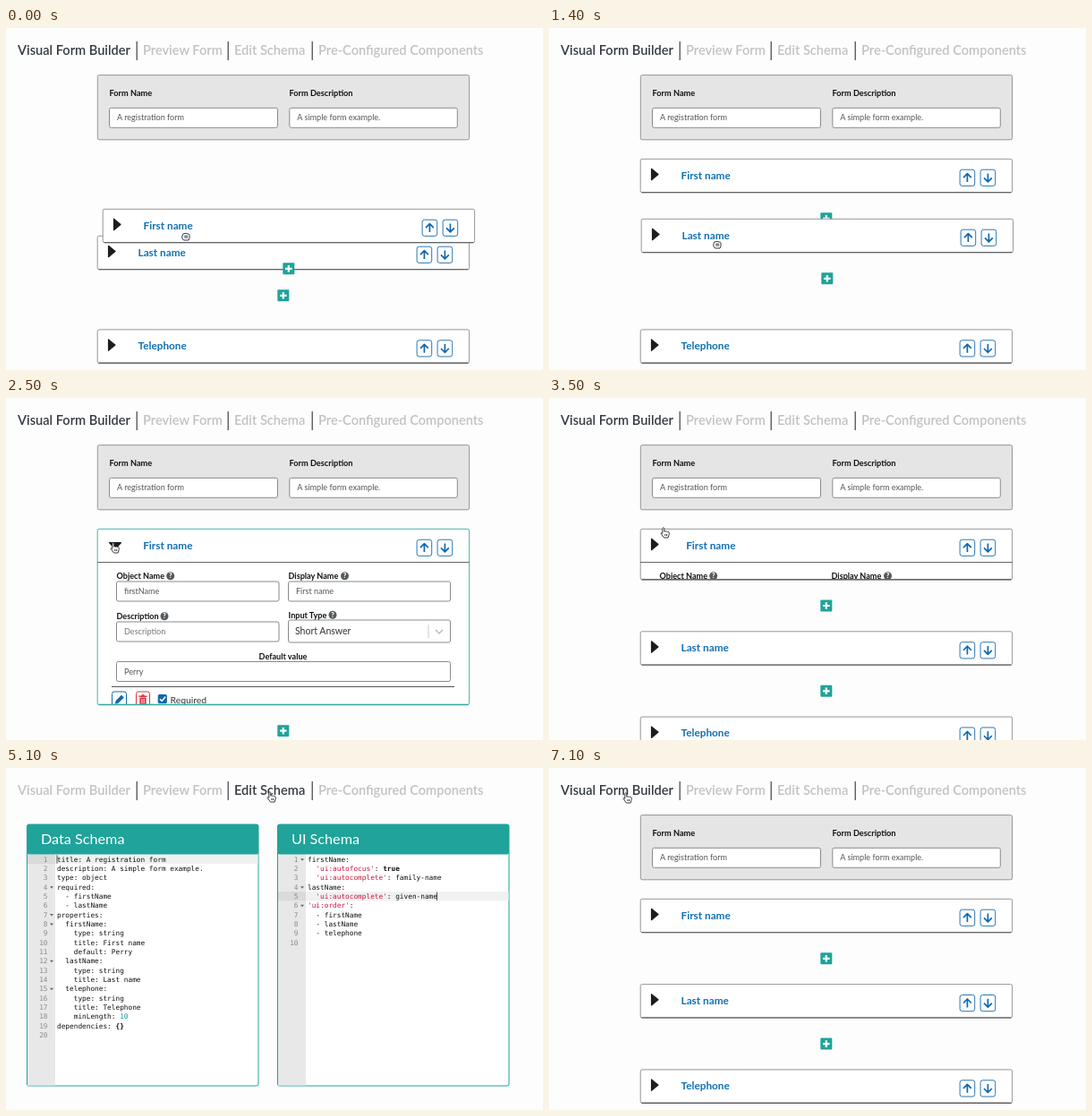
Write an HTML page that moves like this. It is 600x382 px and loops after 7.2 s.

```html
<!DOCTYPE html>
<html lang="en">
<head>
<meta charset="utf-8">
<title>Form builder</title>
<style>
  html, body { margin: 0; width: 100%; height: 100%; overflow: hidden; background: #fdfdfd; }
  svg { display: block; width: 100vw; height: 100vh; }
  text { font-family: Lato, "Open Sans", sans-serif; white-space: pre; }
  .code { font: 7.77px "DejaVu Sans Mono", monospace; }
</style>
</head>
<body>
<svg id="stage" viewBox="0 0 600 382"></svg>
<script>
const LOOP = 7200, STEP = 100;
const TEAL = '#1fa39a', BLUE = '#1268ad', GRAY = '#858b8e', DARK = '#212529';
const TOP = 146, PITCH = 95.3, OPEN_HEIGHT = 173;
const PERSON = 'Perry';

// Pointer path: time, x, y
const pointer = [
  [0, 201, 233], [200, 204, 250], [400, 205, 262], [500, 204, 264], [600, 202, 257],
  [800, 190, 190], [900, 188, 180], [1000, 187, 183], [1100, 187, 215], [1200, 187, 233],
  [1400, 188, 242], [1500, 188.5, 258], [1600, 189, 268], [1700, 187, 260], [2200, 122, 167],
  [3200, 122, 167], [3500, 130, 150], [4000, 184, 32], [4500, 184, 32], [4700, 297, 32],
  [5500, 297, 32], [5600, 340, 95], [5700, 398, 150], [5800, 320, 120], [5900, 170, 70],
  [6000, 53, 40], [6100, 88, 33], [LOOP, 88, 33]
];

const lerp = (a, b, u) => a + (b - a) * u;
const easeOut = (t, start, end) => {
  const u = Math.min(1, Math.max(0, (t - start) / (end - start)));
  return 1 - (1 - u) ** 2;
};

function pointerAt(t) {
  const i = pointer.findIndex(p => p[0] > t);
  const [a, b] = [pointer[i - 1], pointer[i]];
  const u = (t - a[0]) / (b[0] - a[0]);
  return [lerp(a[1], b[1], u), lerp(a[2], b[2], u)];
}

const text = (x, y, size, str, fill = '#555', weight = 400, anchor = 'start') =>
  `<text x="${x}" y="${y}" font-size="${size}" fill="${fill}" font-weight="${weight}" text-anchor="${anchor}">${str}</text>`;
const rect = (x, y, w, h, fill, stroke = 'none', r = 0, sw = 1) =>
  `<rect x="${x}" y="${y}" width="${w}" height="${h}" rx="${r}" fill="${fill}" stroke="${stroke}" stroke-width="${sw}"/>`;
const path = (d, stroke, sw = 1, fill = 'none') =>
  `<path d="${d}" stroke="${stroke}" stroke-width="${sw}" fill="${fill}" stroke-linejoin="round"/>`;
const group = (x, y, body) => `<g transform="translate(${x} ${y})">${body}</g>`;
const field = (x, y, w, h, value = '', fill = '#555') =>
  rect(x, y, w, h, '#fff', GRAY, 2) + text(x + 8.5, y + h / 2 + 3, 9.1, value, fill);

function tabs(active) {
  const names = ['Visual Form Builder', 'Preview Form', 'Edit Schema', 'Pre-Configured Components'];
  return [13, 153, 255, 349].map((x, i) =>
    text(x, 30.4, 14.6, names[i], i === active ? '#343a40' : '#c1c2c4', 600)).join('') +
    path('M146.2 15V36M248.2 15V36M342.2 15V36', '#3c4044', 1.2);
}

const plusButton = (x, y) =>
  rect(x - 6.5, y - 6.5, 13, 13, TEAL, 'none', 1) + path(`M${x - 3.8} ${y}h7.6M${x} ${y - 3.8}v7.6`, '#fff', 2.2);

const arrowButton = (x, dir) => rect(x, 12.2, 16.6, 18.2, '#fff', BLUE, 2.5, .9) +
  path(`M${x + 8.3} ${21.3 + 4.8 * dir}v${-9.4 * dir}m-4.4 ${4.5 * dir}l4.4 ${-4.5 * dir}l4.4 ${4.5 * dir}`, BLUE, 1.7);

const label = (x, y, str, iconX) => text(x, y, 9.1, str, '#111', 700) +
  `<circle cx="${iconX}" cy="${y - 3.3}" r="4.5" fill="#555a5e"/>` + text(iconX, y - .6, 7.5, '?', '#fff', 900, 'middle');

// Fields inside the expanded card, relative to its top left corner
function details() {
  return path('M0 37.5H416', '#666') +
    label(21.5, 56, 'Object Name', 81.7) + field(21.5, 59, 181.5, 22, 'firstName') +
    label(213.5, 56, 'Display Name', 276.5) + field(213.5, 59, 181, 22, 'First name') +
    label(21.5, 101, 'Description', 75) + field(21.5, 104, 181.5, 22, 'Description', '#777') +
    label(213.5, 99.5, 'Input Type', 263) + rect(213.5, 102, 181, 25, '#fff', GRAY, 2) +
    text(221, 118, 10.5, 'Short Answer', '#333') +
    path('M370 107V122', '#ccc') + path('M378 113l4 4l4-4', '#bbb', 1.5) +
    text(207.5, 145.5, 9.1, 'Default value', '#111', 700, 'middle') +
    field(21.5, 148.5, 373, 22, PERSON) + path('M16 176.5H399', '#555') +
    rect(16.5, 182, 16, 19, '#fff', BLUE, 2.5) +
    path('M20 195.5l1-3.5l6-6l2.5 2.5l-6 6z', BLUE, .6, BLUE) +
    rect(43.5, 182, 15, 19, '#fff', '#dc3545', 2.5) +
    path('M46.5 187.2h9M49.5 186h3', '#dc3545', 1.4) + rect(47.3, 188.6, 7.4, 8.4, '#dc3545', 'none', .8) +
    path('M49.4 190v5.5M51 190v5.5M52.6 190v5.5', '#fff', .6) +
    rect(67.7, 185, 10.2, 10.2, '#1367b0', 'none', 1.8) + path('M70 190.2l2.1 2.2l4-4.6', '#fff', 1.5) +
    text(81.5, 194.5, 10.4, 'Required', '#333');
}

function card(title, x, y, extra = 0, open = false, focused = false) {
  const h = 37.4 + extra, edge = focused ? '#35aaa0' : '#8b8b8b';
  let body = rect(.2, .3, 415.4, h, '#fff', edge, 2, .9);
  if (extra) body += `<svg width="416" height="${h}" overflow="hidden">${details()}</svg>`;
  body += path(`M1.5 ${h + .2}H414.5`, focused ? edge : '#666', 1.4) +
    path(open ? 'M13.5 15.5H26.5L20 22.5Z' : 'M12.5 11.3V23.7L20 17.5Z', '#1b1e20', 1.2, '#1b1e20') +
    text(extra ? 51.2 : 45.5, 22.5, 11.8, title, '#1270b3', 700) +
    arrowButton(357.1, 1) + arrowButton(380.1, -1) + plusButton(207.8, h + 29.4);
  return group(102 + x, y, body);
}

function builder(t, px, py) {
  const first = { title: 'First name', x: 0, y: TOP }, last = { title: 'Last name', x: 0, y: TOP + PITCH };
  const follow = (item, grabX, grabY, release) => {
    const drop = easeOut(t, release, release + 200);
    const [hx, hy] = t < release ? [px, py] : pointerAt(release);
    item.x = lerp(hx - grabX, 0, drop);
    item.y = lerp(TOP + hy - grabY, TOP + PITCH, drop);
  };
  let dragged = last;
  if (t < 950) {
    dragged = first;
    follow(first, 195, 177, 500);
    last.y = lerp(232, TOP, easeOut(t, 0, 250));
  } else if (t < 1850) {
    follow(last, 187, 175, 1600);
    first.y = lerp(TOP + PITCH, TOP, easeOut(t, 1130, 1350));
  }
  const extra = OPEN_HEIGHT * (easeOut(t, 2250, 2600) - easeOut(t, 3300, 3600));
  const open = t >= 2250 && t < 3300;
  const draw = item => item === first
    ? card(item.title, item.x, item.y, extra, open, open && t < 3000)
    : card(item.title, item.x, item.y + extra);
  const rest = dragged === first ? last : first;

  return rect(102.3, 52.6, 415.3, 72.2, '#e5e5e6', '#8b8b8b', 2, .9) +
    text(115.5, 75.7, 9.2, 'Form Name', '#111', 700) + field(115.5, 89.3, 188, 22, 'A registration form') +
    text(316.5, 75.7, 9.2, 'Form Description', '#111', 700) + field(316.8, 89.3, 187.5, 22, 'A simple form example.') +
    card('Telephone', 0, TOP + 2 * PITCH + extra) + draw(rest) + draw(dragged);
}

function preview() {
  const names = ['First name', 'Last name', 'Telephone'];
  return text(13, 62, 9.1, 'A simple form example.') +
    text(13, 89.3, 11.4, 'A registration form', TEAL, 700) +
    text(13, 111.7, 9.1, 'A simple form example.') +
    names.map((name, i) => {
      const y = 137 + 53 * i;
      return text(22.5, y, 10.3, name, DARK, 700) +
        (i < 2 ? text(76 - i, y, 7.7, 'Required', '#888') : '') +
        field(22.5, y + 13, 258, 22, i ? '' : PERSON);
    }).join('') +
    rect(264.8, 157.2, 9.6, 7.6, '#fff', '#777', 1) + rect(266.3, 159, 3, 4, '#777') +
    path('M270.5 159.5h2.5M270.5 161h2.5M270.5 162.6h2.5', '#777', .7) +
    rect(13, 291, 49.5, 25, '#1964a3', 'none', 2.5) + text(37.7, 306.8, 9.3, 'Submit', '#fff', 400, 'middle');
}

const dataSchema = `title: A registration form
description: A simple form example.
type: object
required:
  - firstName
  - lastName
properties:
  firstName:
    type: string
    title: First name
    default: ${PERSON}
  lastName:
    type: string
    title: Last name
  telephone:
    type: string
    title: Telephone
    minLength: 10
dependencies: {}
`;
const uiSchema = `firstName:
  'ui:autofocus': true
  'ui:autocomplete': family-name
lastName:
  'ui:autocomplete': given-name
'ui:order':
  - firstName
  - lastName
  - telephone
`;

const highlight = line => line
  .replace(/\b\d+/, '<tspan fill="#099">$&</tspan>')
  .replace(/'.*?'/, '<tspan fill="#d1143f">$&</tspan>')
  .replace(/true|\{\}/, '<tspan font-weight="700">$&</tspan>');

function editor(x, title, source, active, caretX) {
  const rowY = i => 39 + i * 10.32;
  const rows = source.split('\n').map((line, i) => {
    const y = rowY(i) + 2.8;
    const fold = /:$/.test(line) ? path(`M25.5 ${y - 3.6}h4l-2 2.5z`, 'none', 0, '#666') : '';
    return `<text class="code" x="23" y="${y}" fill="#8a8a8a" text-anchor="end">${i + 1}</text>${fold}` +
      `<text class="code" x="33.5" y="${y}" fill="#111">${highlight(line)}</text>`;
  }).join('');
  const top = rowY(active) - 5.2;
  return group(x, 63, rect(0, 0, 258.5, 292, '#fff', TEAL, 2) +
    rect(.5, 33.5, 31, 258, '#e8e8e8') + rect(.5, top, 31, 10.3, '#d9dadb') +
    rect(31.5, top, 226.5, 10.3, '#f0f1f1') + rect(0, 0, 258.5, 33.5, TEAL, 'none', 2) +
    text(15.5, 22, 16.2, title, '#fff') + rows + path(`M${caretX} ${top + .5}v9.3`, '#222', .8));
}

const schema = () => editor(23.5, 'Data Schema', dataSchema, 0, 33.5) + editor(303.5, 'UI Schema', uiSchema, 4, 178);

function cursor(t, x, y) {
  const fist = 'M-4-1q0-2.5 2-2.2q1-1 2-.2q1-.6 1.8.3q2-.2 2.2 1.6V1.2L3 4H-2.5L-4.3 1.3ZM-1.8-.8h4M-1.8 1h4';
  const hand = 'M-3.2-4.5q1-1.7 2 0V-.8q1-1 1.9.1q1-.8 1.8.2q1.3-.6 1.7.7V2.6L3 6H-1.5L-5 1.3q.3-1.4 1.8 0ZM-.2 2v2M1.6 2v2';
  return group(x, y, path(t < 2100 ? fist : hand, DARK, .9, '#fff'));
}

function scene(t) {
  const [x, y] = pointerAt(t);
  const view = t < 4100 || t >= 6500 ? 0 : t < 5000 ? 1 : 2;
  return tabs(view) + [builder, preview, schema][view](t, x, y) + cursor(t, x, y);
}

const stage = document.getElementById('stage');
let shown = -1;
function tick() {
  const t = Math.floor(performance.now() % LOOP / STEP) * STEP;
  if (t !== shown) stage.innerHTML = scene(shown = t);
  requestAnimationFrame(tick);
}
tick();
</script>
</body>
</html>
```
